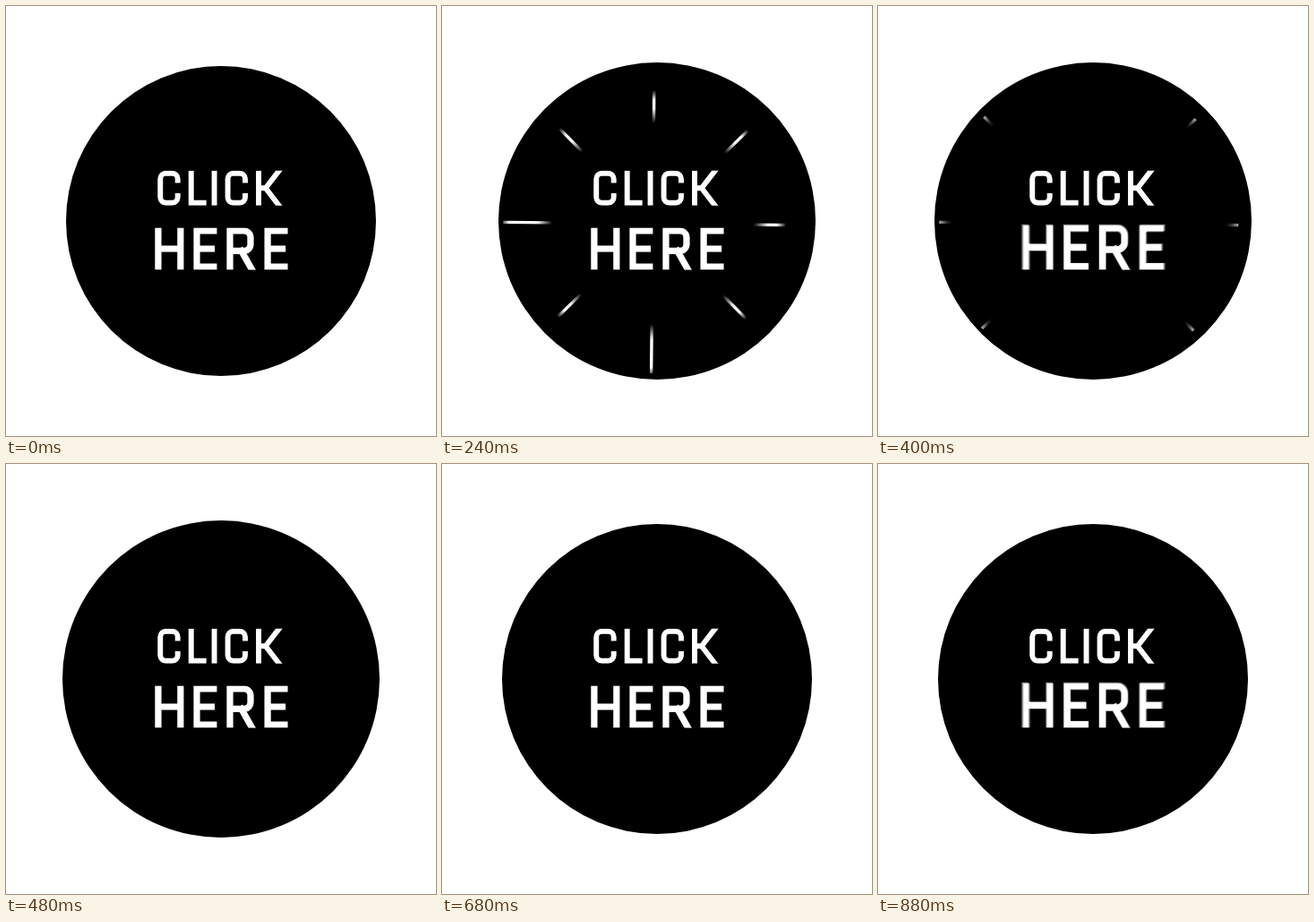
Recreate the animation shown at these times as an HTML page with a canvas. Size 480 by 480 pixels, loop 0.92 s.

```html
<!DOCTYPE html>
<html lang="en">
<head>
<meta charset="utf-8">
<title>Click here</title>
<style>
html, body { margin: 0; width: 100%; height: 100%; overflow: hidden; background: #fff; }
canvas { display: block; width: 480px; height: 480px; }
</style>
</head>
<body>
<canvas id="stage" width="480" height="480" role="img" aria-label="CLICK HERE"></canvas>
<script>
const ctx = document.getElementById('stage').getContext('2d');
const STEP = 40, STEPS = 23, BEAT = 6;
const SHUTTER = 0.5, SAMPLES = 15;
const clamp = v => Math.max(0, Math.min(1, v));

// Lettering in units of cap height. Each glyph gets its centre-line box.
const WEIGHT = 0.152, GAP = 0.233, CORNER = 0.16;

function line(p, ...points) {
  points.forEach(([x, y], i) => i ? p.lineTo(x, y) : p.moveTo(x, y));
}

const glyphs = {
  C: { width: 0.65, draw(p, l, r, t, b) {
    p.moveTo(r, t + 0.2);
    p.arcTo(r, t, l, t, CORNER);
    p.arcTo(l, t, l, b, CORNER);
    p.arcTo(l, b, r, b, CORNER);
    p.arcTo(r, b, r, t, CORNER);
    p.lineTo(r, b - 0.2);
  } },
  // The foot of L reaches into the gap after it.
  L: { width: 0.43, draw(p, l, r, t, b) { line(p, [l, t], [l, b], [r + 0.08, b]); } },
  I: { width: WEIGHT, draw(p, l, r, t, b) { line(p, [l, t], [l, b]); } },
  K: { width: 0.74, draw(p, l, r, t, b) {
    const elbow = [l + 0.2, 0.5];
    line(p, [l, t], [l, b]);
    line(p, [r, t - 0.08], elbow, [r, b + 0.08]);
    line(p, [l, 0.5], elbow);
  } },
  H: { width: 0.68, draw(p, l, r, t, b) {
    line(p, [l, t], [l, b]);
    line(p, [r, t], [r, b]);
    line(p, [l, 0.5], [r, 0.5]);
  } },
  E: { width: 0.55, draw(p, l, r, t, b) {
    line(p, [r, t], [l, t], [l, b], [r, b]);
    line(p, [l, 0.5], [r - 0.05, 0.5]);
  } },
  R: { width: 0.66, draw(p, l, r, t, b) {
    const waist = 0.55, bowl = r - 0.02;
    p.moveTo(l, b);
    p.lineTo(l, t);
    p.arcTo(bowl, t, bowl, waist, CORNER);
    p.arcTo(bowl, waist, l, waist, CORNER);
    p.lineTo(l, waist);
    line(p, [l + 0.27, waist], [r + 0.02, b + 0.08]);
  } }
};

function word(text) {
  const path = new Path2D(), inset = WEIGHT / 2;
  let x = 0;
  for (const c of text) {
    const { width, draw } = glyphs[c];
    draw(path, x + inset, x + width - inset, inset, 1 - inset);
    x += width + GAP;
  }
  return { path, width: x - GAP };
}

const click = word('CLICK'), here = word('HERE');

function drawWord({ path, width }, centre, bottom, cap) {
  ctx.save();
  ctx.translate(centre - width * cap / 2, bottom - cap);
  ctx.scale(cap, cap);
  ctx.beginPath();
  ctx.rect(-1, 0, width + 2, 1);
  ctx.clip();
  ctx.lineWidth = WEIGHT;
  ctx.lineCap = 'square';
  ctx.strokeStyle = '#fff';
  ctx.stroke(path);
  ctx.restore();
}

function drawHere(t) {
  const p = t % BEAT;
  const swell = clamp(Math.min(p - 1, 5 - p));
  drawWord(here, 240.4, 294.6, 47.2 * (1 + 0.09 * swell));
}

// Eight rays, clockwise from the top, shoot out and then leave from the inside.
const RAYS = 8, INNER = 112, OUTER = 167, TRAVEL = 2.5, TILT = 0.01;

function drawRay(i, t) {
  const headLead = i === 4 || i === 6 ? 1 : 0;
  const tailLead = i % 4 === 0 ? 1 : 0;
  const reach = start => INNER + (OUTER - INNER) * clamp((t - start) / TRAVEL);
  const head = reach(4.8 - headLead), tail = reach(8.25 - tailLead);
  if (head <= tail) return;
  ctx.save();
  ctx.translate(235.3, 243);
  ctx.rotate(i * 2 * Math.PI / RAYS + TILT);
  const fade = ctx.createLinearGradient(0, -tail, 0, -tail - 17);
  fade.addColorStop(0, 'rgba(255,255,255,0)');
  fade.addColorStop(1, '#fff');
  ctx.fillStyle = fade;
  ctx.fillRect(-1.7, -head, 3.4, head - tail);
  ctx.restore();
}

// Motion blur: the mean of several moments while the shutter is open.
function blurred(k, paint) {
  ctx.save();
  ctx.globalCompositeOperation = 'lighter';
  ctx.globalAlpha = 1 / SAMPLES;
  for (let i = 0; i < SAMPLES; i++) paint(k + SHUTTER * i / SAMPLES);
  ctx.restore();
}

// The disc swells and shrinks twice, then rests.
function radius(k) {
  if (k < 2 || k > 14) return 173;
  const p = (k - 2) % BEAT;
  return 173 + 2 * Math.min(p, BEAT - p);
}

function draw(k) {
  ctx.fillStyle = '#fff';
  ctx.fillRect(0, 0, 480, 480);
  ctx.fillStyle = '#000';
  ctx.beginPath();
  ctx.arc(240, 240, radius(k), 0, Math.PI * 2);
  ctx.fill();
  drawWord(click, 238.6, 222.8, 39);
  blurred(k, t => {
    for (let i = 0; i < RAYS; i++) drawRay(i, t);
    drawHere(t);
  });
}

const start = performance.now();
function tick() {
  draw(Math.floor((performance.now() - start) / STEP) % STEPS);
  requestAnimationFrame(tick);
}
tick();
</script>
</body>
</html>
```
